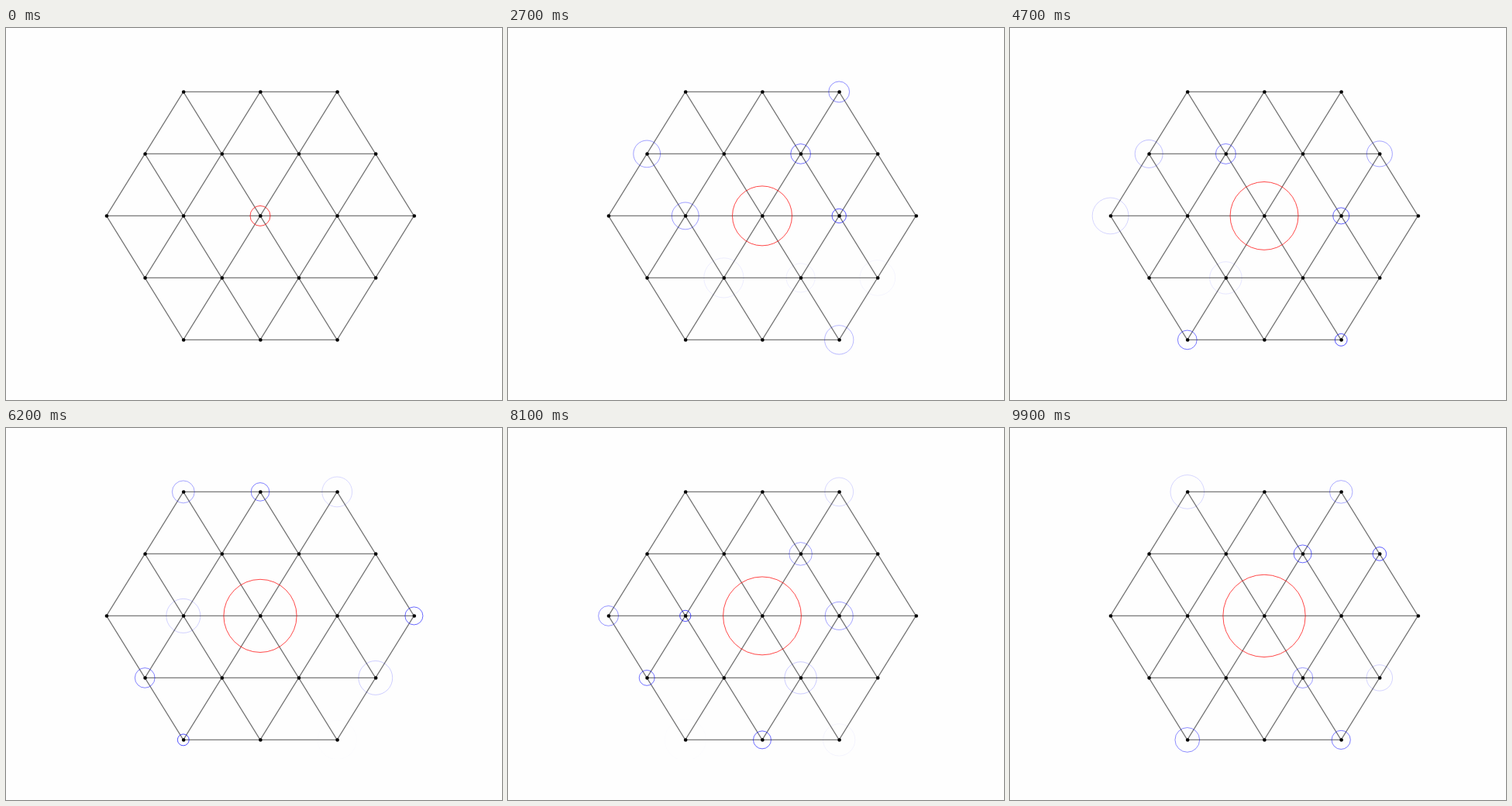
Write an HTML page with a canvas that moves like this. It is 640x480 px and loops after 10000 ms.

```html
<!DOCTYPE html>
<html>
<head>
<meta charset="utf-8">
<style>
html, body { margin: 0; width: 100%; height: 100%; overflow: hidden; background: #fefefe; }
canvas { display: block; }
</style>
</head>
<body>
<canvas id="stage" width="640" height="480"></canvas>
<script>
const ctx = document.getElementById('stage').getContext('2d');
const LOOP = 10, STEP = 0.1, PITCH = 99.2, ROW = 80;
const centre = { x: 328, y: 242.4 };

// Hexagonal lattice, row by row, two steps out from the centre.
const nodes = [];
for (let row = -2; row <= 2; row++) {
  const count = 5 - Math.abs(row);
  for (let i = 0; i < count; i++)
    nodes.push({ x: centre.x + (i - (count - 1) / 2) * PITCH, y: centre.y + row * ROW });
}
const outer = nodes.filter(n => Math.hypot(n.x - centre.x, n.y - centre.y) > 1);
const edges = nodes.flatMap((a, i) => nodes.slice(i + 1)
  .filter(b => Math.hypot(a.x - b.x, a.y - b.y) < PITCH + 1)
  .map(b => [a, b]));

let seed = 7;
function random(min, max) {
  seed = (seed * 16807) % 2147483647;
  return min + (max - min) * seed / 2147483647;
}

// Pulses start at a steady rate, each on a random idle node.
const pulses = [];
const busyUntil = new Map();
for (let birth = 0.05; birth < LOOP; birth += 0.19) {
  const idle = outer.filter(n => !(busyUntil.get(n) > birth));
  const node = idle[Math.floor(random(0, idle.length))];
  const life = random(1.3, 2.1);
  pulses.push({ node, birth, life, spread: random(13, 22) });
  busyUntil.set(node, birth + life);
}

function ring({ x, y }, r, color, alpha) {
  ctx.globalAlpha = alpha;
  ctx.strokeStyle = color;
  ctx.lineWidth = 0.8;
  ctx.beginPath();
  ctx.arc(x, y, r, 0, 2 * Math.PI);
  ctx.stroke();
  ctx.globalAlpha = 1;
}

function drawPulse({ node, birth, life, spread }, t) {
  const age = (t - birth) / life;
  if (age > 0 && age < 1) ring(node, 6 + spread * age ** 0.8, '#00f', 0.9 * (1 - age));
}

function drawLattice() {
  ctx.strokeStyle = '#787878';
  ctx.lineWidth = 1.3;
  ctx.beginPath();
  for (const [a, b] of edges) {
    ctx.moveTo(a.x, a.y);
    ctx.lineTo(b.x, b.y);
  }
  ctx.stroke();
}

function drawDots() {
  ctx.fillStyle = '#000';
  for (const { x, y } of nodes) {
    ctx.beginPath();
    ctx.arc(x + 0.4, y + 0.1, 2.3, 0, 2 * Math.PI);
    ctx.fill();
  }
}

function draw(t) {
  ctx.fillStyle = '#fefefe';
  ctx.fillRect(0, 0, 640, 480);
  ctx.save();
  ctx.beginPath();
  ctx.rect(80, 57.6, 496, 369.6);
  ctx.clip();
  drawLattice();
  for (const pulse of pulses) drawPulse(pulse, t);
  ring(centre, 13 + 18 * t ** 0.35, '#f00', 0.9);
  drawDots();
  ctx.restore();
}

function tick() {
  const t = performance.now() / 1000 % LOOP;
  draw(Math.floor(t / STEP + 1e-6) * STEP);
  requestAnimationFrame(tick);
}
tick();
</script>
</body>
</html>
```
